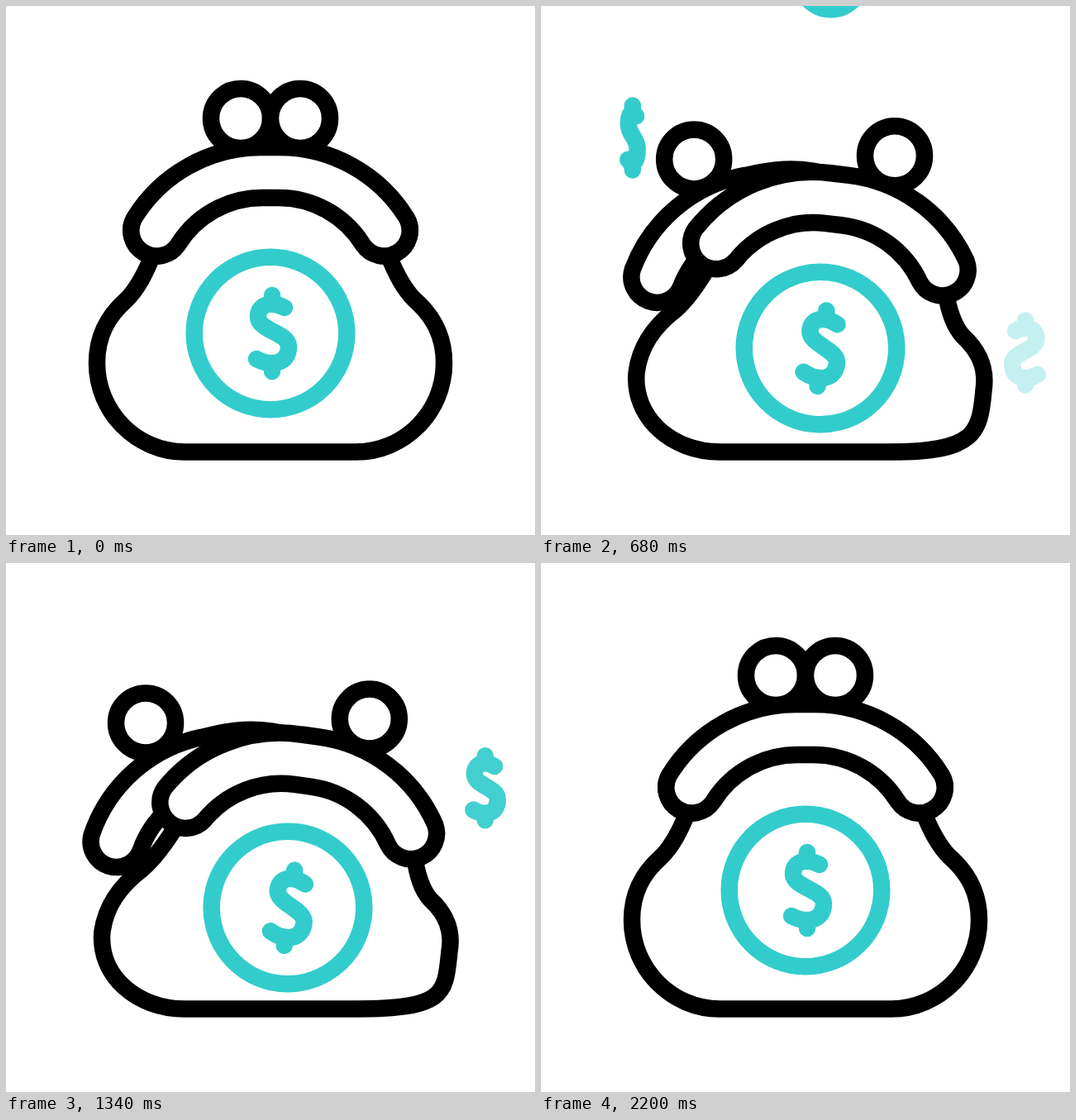
These frames come from a looping animation (640 by 640 pixels, 2400 ms). An HTML page:

```html
<!DOCTYPE html>
<html lang="en">
<head>
<meta charset="utf-8">
<title>Purse</title>
<style>
  html, body { margin: 0; width: 100%; height: 100%; overflow: hidden; background: #fff; }
  svg { display: block; width: 100%; height: 100%; }
  svg * { vector-effect: non-scaling-stroke; }
  .line { fill: #fff; stroke: #000; stroke-width: 20.5; stroke-linecap: round; stroke-linejoin: round; }
  .teal { stroke: #3cc; }
  .open { fill: none; }
</style>
</head>
<body>
<svg viewBox="0 0 640 640">
  <defs>
    <path id="frame" d="M310 171A180 180 0 0 0 155 257A31 31 0 0 0 208 289A120 120 0 0 1 310 232
      H330A120 120 0 0 1 432 289A31 31 0 0 0 485 257A180 180 0 0 0 330 171Z"/>
    <path id="dollar" d="M15 -31C0 -39 -17 -36 -17 -20C-17 -3 20 -1 20 16C20 38 -2 40 -19 31M0 -46V-36M0 46V36"/>
  </defs>
  <use class="line teal open sign" href="#dollar"/>
  <use class="line teal open sign" href="#dollar"/>
  <circle id="backBall" class="line" r="36"/>
  <use id="backFrame" class="line" href="#frame"/>
  <circle class="line teal coin" r="37"/>
  <circle class="line teal coin" r="37"/>
  <circle class="line teal coin" r="37"/>
  <circle id="frontBall" class="line" r="36"/>
  <path id="lining" fill="#fff" d="M208 289A120 120 0 0 1 310 232H330A120 120 0 0 1 432 289V330H208Z"/>
  <path id="body" class="line"/>
  <use id="frontFrame" class="line" href="#frame"/>
  <g id="emblem">
    <circle class="line teal open" r="92.3"/>
    <use class="line teal open" href="#dollar" x="2"/>
  </g>
</svg>
<script>
const LOOP = 2400, HALF = 1104, BASE = 539.5;
const $ = id => document.getElementById(id);
const signs = document.querySelectorAll('.sign');
const coins = document.querySelectorAll('.coin');
const lerp = (a, b, k) => a + (b - a) * k;

// Left half of the closed body, from neck to base; the right half mirrors it
const leftSide = [[178, 300], [168, 325], [159, 342], [146, 355], [122, 376], [110, 400], [110, 432],
  [110, 491], [158, BASE], [216, BASE]];
const rightSide = leftSide.map(([x, y]) => [640 - x, y]).reverse();

// Symmetric cubic-bezier(.77, 0, .23, 1)
function ease(x) {
  let lo = 0, hi = 1;
  for (let i = 0; i < 24; i++) {
    const s = (lo + hi) / 2, r = 1 - s;
    if (3 * r * r * s * .77 + 3 * r * s * s * .23 + s ** 3 < x) lo = s; else hi = s;
  }
  return lo * lo * (3 - 2 * lo);
}

const move = (el, x, y, rest = '') => el.setAttribute('transform', `translate(${x} ${y}) ${rest}`);

// Leans points to the right and lowers them, more so the higher they are
const sag = (points, k, drop, relief) => points.map(([x, y]) => {
  const h = (BASE - y) / 240;
  return [x + 33 * h * h * k, y + (drop - relief * h) * h * k];
});

function bodyPath(k) {
  const left = sag(leftSide, k, 47, 35), right = sag(rightSide, k, 112, 56);
  // The right corner gets squarer
  right[1][0] += 52 * k;
  right[2][1] += 10 * k;
  return `M${left[0]}C${left.slice(1)}L${right[0]}C${right.slice(1)}`;
}

function drawPurse(t) {
  const k = 1.01 * ease(Math.max(0, Math.min(t, 2 * HALF - t)) / HALF);
  move($('backBall'), lerp(284, 166, k), lerp(136, 195, k));
  move($('frontBall'), lerp(356, 442, k), lerp(136, 190, k));
  move($('backFrame'), -50 * k, 67 * k, `rotate(${-13 * k} 183 272)`);
  for (const id of ['frontFrame', 'lining']) move($(id), 34.5 * k, 38 * k, `rotate(${8 * k} 320.5 272)`);
  move($('emblem'), 320 + 21.5 * k, 396 + 21.5 * k, `rotate(${8 * k})`);
  $('body').setAttribute('d', bodyPath(k));
}

// Signs drift up while spinning about their vertical axis
function drawSign(el, age, x, y) {
  const turn = -Math.cos(Math.PI * age / 635) * .82 || .001;
  el.setAttribute('opacity', Math.max(0, Math.min(1, age / 200, (790 - age) / 80)));
  move(el, x - .0095 * age, y - .223 * age, `scale(${turn} .848)`);
}

// Coins drop from above into the gap behind the front frame
function drawCoin(el, age, x) {
  const y = -34 + 1.2 * age;
  el.setAttribute('visibility', y > -50 && y < 290 ? 'visible' : 'hidden');
  move(el, lerp(x, 250, (y + 34) / 324), y);
}

function draw(now) {
  const t = now % LOOP;
  drawPurse(t);
  drawSign(signs[0], t - 290, 114.5, 246.7);
  drawSign(signs[1], t - 625, 586.5, 432);
  [351, 232, 290].forEach((x, i) => drawCoin(coins[i], t - 680 - 180 * i, x));
}

const start = performance.now();
(function tick() {
  draw(performance.now() - start);
  requestAnimationFrame(tick);
})();
</script>
</body>
</html>
```
